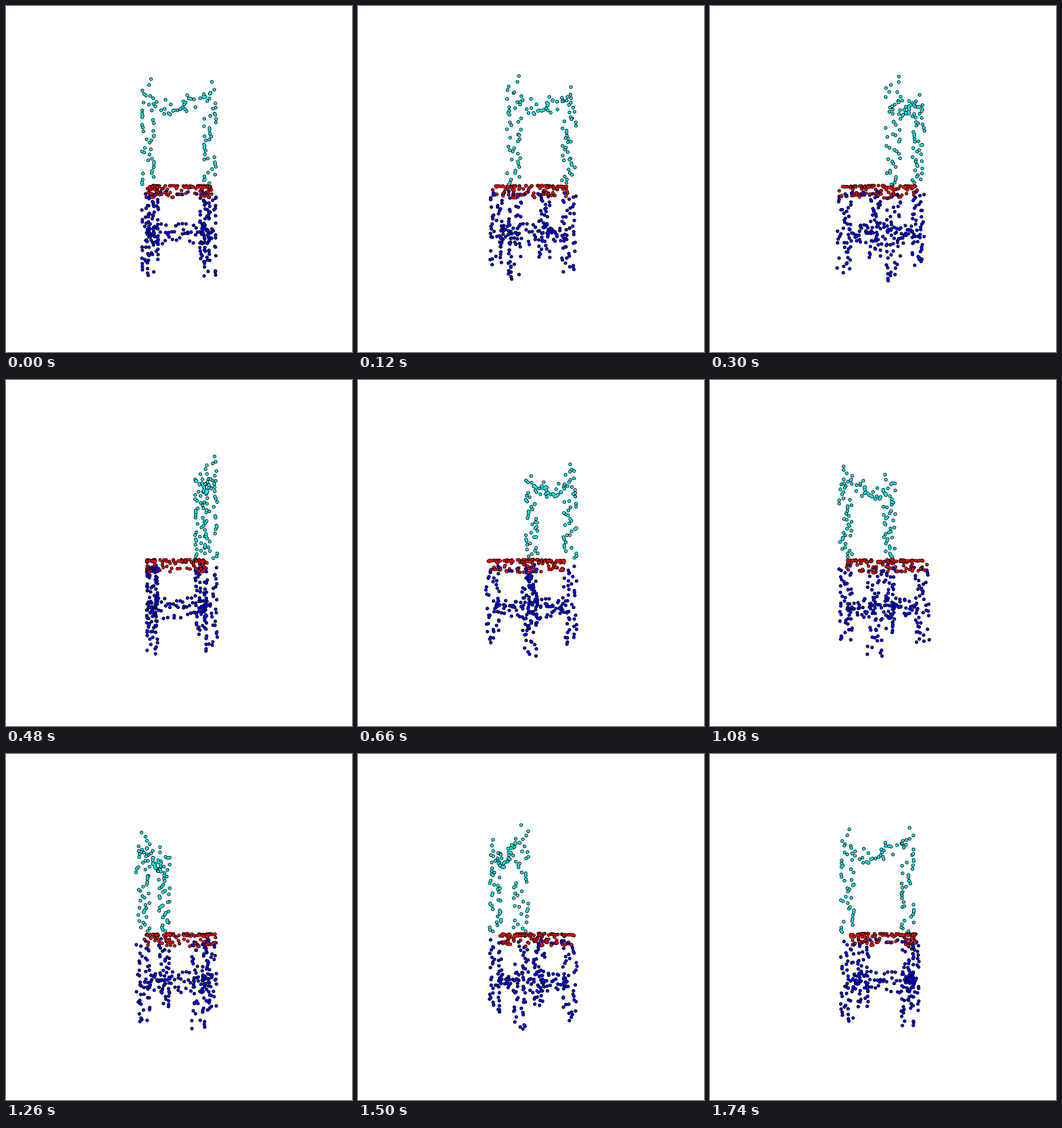
A matplotlib script that plays this animation: 512 by 512 pixels, repeating every 1800 ms.

```python
import matplotlib.pyplot as plt
import numpy as np
from matplotlib.animation import FuncAnimation

SIZE, DPI = 512, 100
FRAMES, INTERVAL = 30, 60
CAMERA = 420            # eye distance; one unit is one pixel at the centre
BANDS = 6               # depth slices that share one outline
OUTER, INNER = 5.2, 3.5  # dot diameters in pixels

CYAN, RED, BLUE = (0, 1, 1), (1, 0, 0), (0, 0, 1)
rng = np.random.default_rng(11)
X, Y, Z = range(3)


def bar(n, axis, lo, hi, bias=1.0):
    """Random points on the four long faces of a box, evenly spread along axis."""
    lo, hi = np.array(lo, float), np.array(hi, float)
    t = rng.random((n, 3))
    t[:, axis] = (np.arange(n) + rng.random(n)) / n
    cross = [a for a in range(3) if a != axis]
    face = rng.choice(cross, n)
    t[np.arange(n), face] = rng.integers(0, 2, n)
    if axis != Y:
        t[:, Y] = 1 - (1 - t[:, Y]) ** bias
    return lo + t * (hi - lo)


def mirrored(p):
    return p * [-1, 1, 1]


def build_back():
    posts = [bar(42, Y, (-49, -8, 32), (-34, 124, 46)),
             mirrored(bar(42, Y, (-49, -8, 32), (-34, 124, 46)))]
    tips = np.array([(-37, 132, 45), (44, 130, 40)], float)
    rail = np.array([
        (-18, 106), (-30, 103), (-32, 98), (-11, 99), (-24, 92), (-19, 93),
        (-20, 88), (-14, 88), (-12, 87), (-8, 91), (-6, 92), (-2, 92),
        (2, 94), (5, 96), (8, 94), (10, 90), (7, 100), (6, 104), (9, 103),
        (11, 113), (13, 107), (16, 108), (20, 106), (22, 96), (28, 107),
        (33, 111), (35, 109)], float)
    depth = rng.uniform(35, 44, len(rail))
    return np.vstack([*posts, tips, np.column_stack([rail, depth])])


def build_seat():
    lo, hi = -25, -11
    return np.vstack([
        bar(30, X, (-45, lo, -47), (45, hi, -36), 2.6),
        bar(28, X, (-42, lo, 28), (42, hi, 38), 2.6),
        bar(27, Z, (-45, lo, -47), (-33, hi, 37), 1.8),
        bar(27, Z, (33, lo, -47), (45, hi, 37), 1.8)])


def build_legs():
    parts = []
    for z0, z1 in ((32, 46), (-47, -33)):
        parts.append(bar(42, Y, (-49, -133, z0), (-34, -19, z1)))
        parts.append(mirrored(bar(42, Y, (-49, -133, z0), (-34, -19, z1))))
        parts.append(bar(17, X, (-33, -86, z0 + 2), (33, -73, z1 - 2)))
    for x0 in (-45, 35):
        parts.append(bar(18, Z, (x0, -86, -33), (x0 + 10, -73, 33)))
    parts.append(bar(6, X, (-33, -25, -45), (33, -20, -36)))
    return np.vstack(parts)


groups = [(build_back(), CYAN), (build_seat(), RED), (build_legs(), BLUE)]
points = np.vstack([p for p, _ in groups])
fills = np.vstack([np.tile(c, (len(p), 1)) for p, c in groups]).astype(float)
count = len(points)

# every point is an outline disc and a smaller coloured disc on top
is_fill = np.repeat([0, 1], count)
colors = np.vstack([np.zeros((count, 3)), fills])
areas = (np.where(is_fill, INNER, OUTER) * 72 / DPI) ** 2


def project(angle):
    x, y, z = points.T
    c, s = np.cos(angle), np.sin(angle)
    depth = z * c - x * s
    scale = CAMERA / (CAMERA - depth)
    centre = SIZE / 2
    xy = np.column_stack([centre + scale * (x * c + z * s), centre - scale * y])
    return xy, depth


fig = plt.figure(figsize=(SIZE / DPI, SIZE / DPI), dpi=DPI, facecolor="white")
ax = fig.add_axes([0, 0, 1, 1])
ax.set(xlim=(0, SIZE), ylim=(SIZE, 0))
ax.axis("off")
dots = ax.scatter(np.zeros(2 * count), np.zeros(2 * count), s=areas,
                  c=colors, linewidths=0)


def update(frame):
    xy, depth = project(2 * np.pi * frame / FRAMES)
    band = np.floor((depth + 70) / 140 * BANDS)
    order = np.lexsort((np.tile(depth, 2), is_fill, np.tile(band, 2)))
    dots.set_offsets(np.tile(xy, (2, 1))[order])
    dots.set_sizes(areas[order], DPI)
    dots.set_facecolors(colors[order])
    return (dots,)


anim = FuncAnimation(fig, update, frames=FRAMES, interval=INTERVAL,
                     repeat=True, repeat_delay=0)
plt.show()
```
